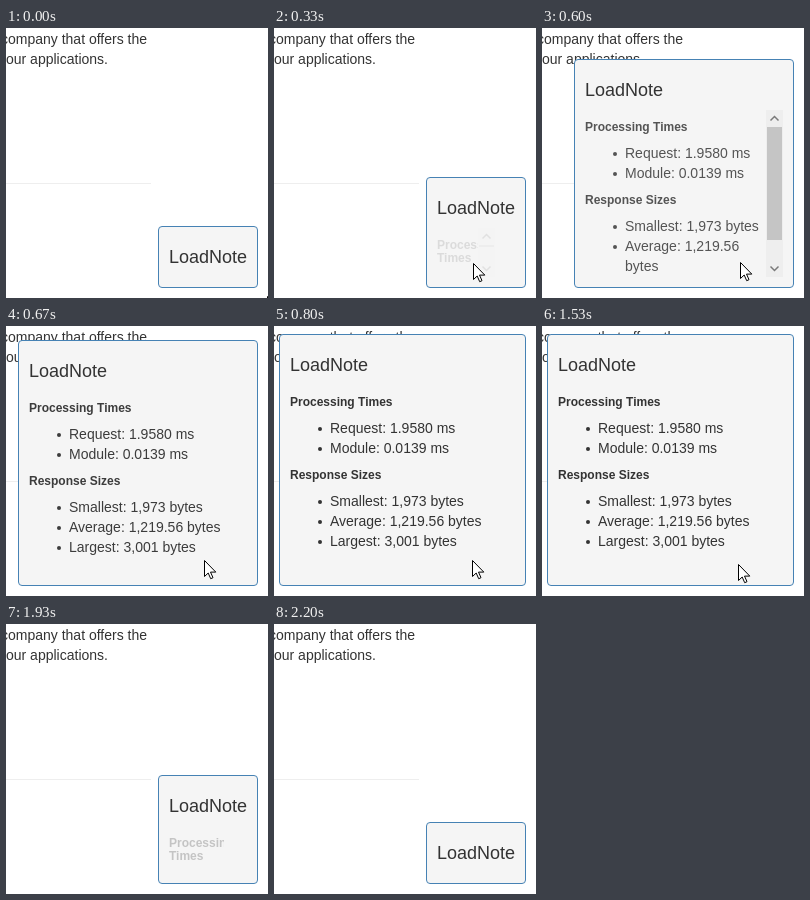
An HTML page that plays this animation: 262 px wide and 270 px high, repeating every 2870 ms.

```html
<!DOCTYPE html>
<html lang="en">
<head>
<meta charset="utf-8">
<title>Stats panel</title>
<style>
  html, body { margin: 0; width: 100%; height: 100%; overflow: hidden; background: #fff; }
  body { position: relative; color: #333; font: 14px/20px "Liberation Sans", Arial, sans-serif; }
  #stage { position: absolute; left: 0; top: 0; width: 262px; height: 270px; overflow: hidden; }
  .line { position: absolute; white-space: nowrap; }
  #rule { position: absolute; left: 0; top: 155px; width: 145px; height: 1px; background: #eee; }
  #box {
    position: absolute; right: 10px; bottom: 10px; box-sizing: border-box;
    padding: 10px; border: 1px solid #4682b4; border-radius: 4px;
    background: #f5f5f5; overflow: hidden;
  }
  h4, h6 { position: relative; top: 1px; margin: 10px 0; }
  h4 { font-size: 18px; font-weight: 400; line-height: 19.8px; white-space: nowrap; }
  h6 { font-size: 12px; font-weight: 700; line-height: 13.2px; }
  ul { margin: 10px 0; padding-left: 40px; list-style: none; }
  li { position: relative; }
  li::before {
    content: ""; position: absolute; left: -12px; top: 9px;
    width: 4px; height: 4px; border-radius: 50%; background: #333;
  }
  #data { position: relative; overflow: hidden; }
  #list { display: flow-root; }
  #bar { position: absolute; right: 0; top: 0; width: 17px; height: 100%; background: #ededed; overflow: hidden; }
  #bar svg { position: absolute; left: 0; fill: none; stroke: #606060; stroke-width: 1.5; }
  #up { top: 0; }
  #down { bottom: 0; }
  #thumb { position: absolute; left: 1px; top: 17px; width: 15px; background: #bcbcbc; }
  #cursor { position: absolute; left: 0; top: 0; overflow: visible; }
</style>
</head>
<body>
<div id="stage">
  <div class="line" style="left:-5px;top:1px">company that offers the</div>
  <div class="line" style="left:0;top:21px">our applications.</div>
  <div id="rule"></div>
  <div id="box">
    <h4>LoadNote</h4>
    <div id="data">
      <div id="list">
        <h6>Processing Times</h6>
        <ul><li>Request: 1.9580 ms</li><li>Module: 0.0139 ms</li></ul>
        <h6>Response Sizes</h6>
        <ul><li>Smallest: 1,973 bytes</li><li>Average: 1,219.56 bytes</li><li>Largest: 3,001 bytes</li></ul>
      </div>
      <div id="bar">
        <svg id="up" width="17" height="17"><path d="M4.5 10.5l4-4 4 4"/></svg>
        <div id="thumb"></div>
        <svg id="down" width="17" height="17"><path d="M4.5 6.5l4 4 4-4"/></svg>
      </div>
    </div>
  </div>
  <svg id="cursor" width="13" height="20">
    <path d="M.5 .5V16.5L4.2 13 6.7 18.7 9 17.7 6.5 12.1H11.8Z" fill="#fff" stroke="#000"/>
  </svg>
</div>
<script>
const LOOP = 2870, TICK = 200 / 3;
const OPEN_AT = 126.5, CLOSE_AT = 1525, DURATION = 610;
const FULL_W = 225, FULL_H = 190, BAR = 17;
const ENTER_AT = 2 * TICK, ENTER_TIME = 4 * TICK, LEAVE_AT = 22 * TICK;

const $ = id => document.getElementById(id);
const box = $("box"), data = $("data"), list = $("list");
const bar = $("bar"), thumb = $("thumb"), cursor = $("cursor");

const clamp = u => Math.min(1, Math.max(0, u));
const swing = u => .5 - Math.cos(Math.PI * clamp(u)) / 2;

function drawBar(h, opening) {
  list.style.paddingRight = 0;
  const scrolls = opening && list.offsetHeight > h;
  bar.style.display = scrolls ? "block" : "none";
  if (!scrolls) return;
  list.style.paddingRight = BAR + "px";
  const track = h - 2 * BAR;
  thumb.style.height = Math.max(0, Math.round(track * h / list.offsetHeight)) + "px";
}

function drawBox(time) {
  const opening = time < CLOSE_AT;
  const p = opening
    ? swing((time - OPEN_AT) / DURATION)
    : 1 - swing((time - CLOSE_AT) / DURATION);
  const w = Math.round(FULL_W * p), h = Math.round(FULL_H * p);
  box.style.width = 22 + Math.max(78, w) + "px";
  box.style.height = 62 + h + "px";
  data.style.width = w + "px";
  data.style.height = h + "px";
  data.style.opacity = opening ? p ** 1.5 : p;
  drawBar(h, opening);
}

// The pointer glides in, rests, then drops off the bottom edge.
function drawCursor(time) {
  const away = (1 - clamp((time - ENTER_AT) / ENTER_TIME)) ** 3;
  const n = Math.max(0, (time - LEAVE_AT) / TICK);
  const x = Math.round(198 + 63 * away - 2 * n);
  const y = Math.round(234 + 34 * away + 4 * n * n);
  cursor.style.transform = `translate(${x}px, ${y}px)`;
}

const start = performance.now();
let shown = -1;
function frame() {
  const t = (performance.now() - start) % LOOP;
  // The picture advances in even ticks, rounded to 10 ms.
  const k = Math.floor((t + 3.4) / TICK);
  if (k !== shown) {
    shown = k;
    drawBox(k * TICK);
    drawCursor(k * TICK);
  }
  requestAnimationFrame(frame);
}
frame();
</script>
</body>
</html>
```
